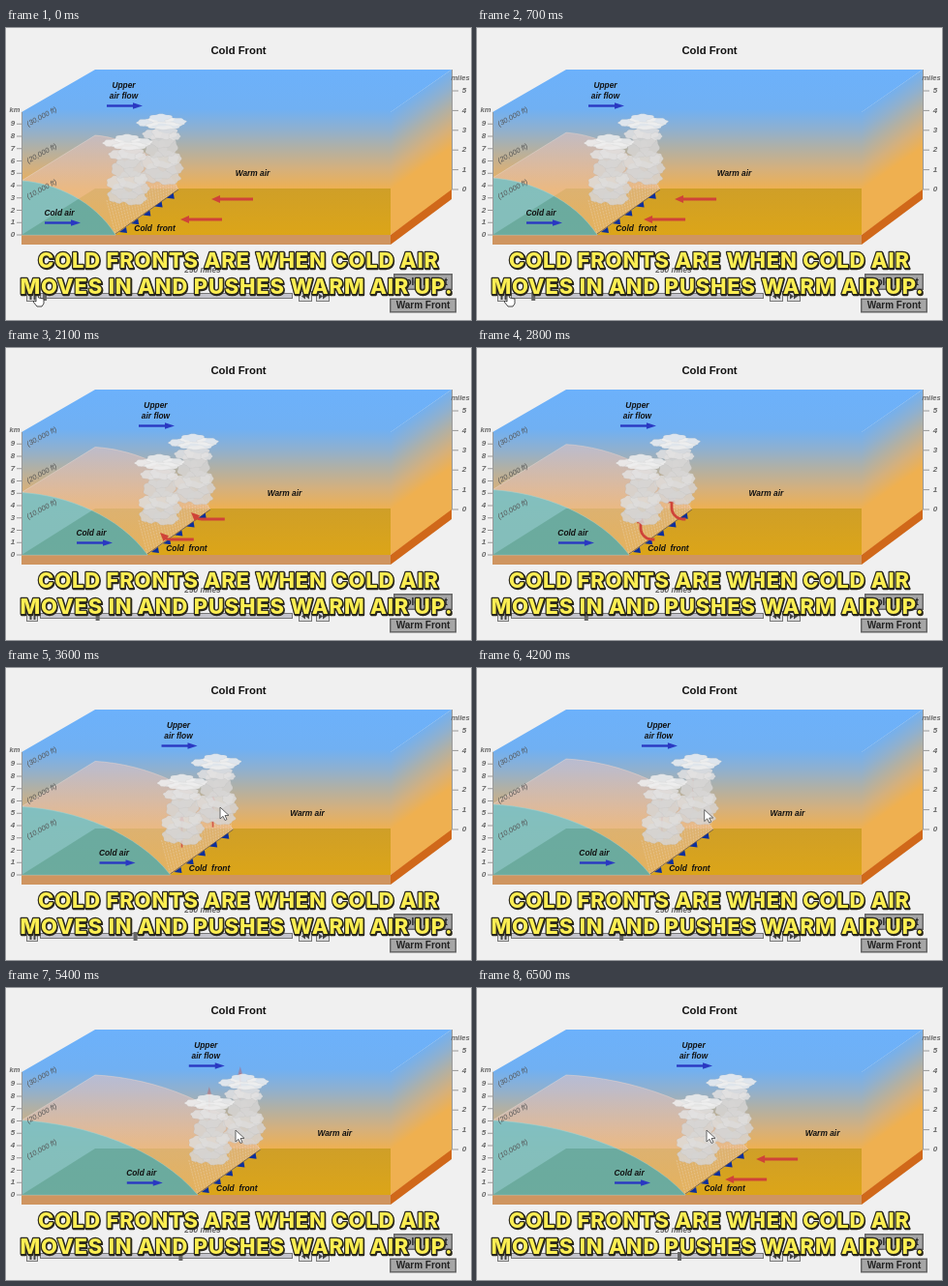
Recreate the animation shown at these times as an HTML page with a canvas. Size 480 px wide and 302 px high, loop 6.6 s.

```html
<!DOCTYPE html>
<html>
<head>
<meta charset="utf-8">
<title>Cold Front</title>
<style>
html, body { margin: 0; width: 100%; height: 100%; overflow: hidden; background: #f0f0f0; }
canvas { display: block; width: 480px; height: 302px; }
</style>
</head>
<body>
<canvas id="stage"></canvas>
<script>
const W = 480, H = 302, LOOP = 6600;
const canvas = document.getElementById('stage');
const c = canvas.getContext('2d');
const dpr = window.devicePixelRatio || 1;
canvas.width = W * dpr;
canvas.height = H * dpr;

const SANS = '"Liberation Sans", Arial, sans-serif';
const clamp = (v) => Math.max(0, Math.min(1, v));

function poly(pts, fill, stroke, width = 1) {
  c.beginPath();
  pts.forEach(([x, y], i) => i ? c.lineTo(x, y) : c.moveTo(x, y));
  if (fill) { c.closePath(); c.fillStyle = fill; c.fill(); }
  if (stroke) { c.strokeStyle = stroke; c.lineWidth = width; c.stroke(); }
}

function label(str, x, y, size, color = '#111', style = 'italic bold') {
  c.font = `${style} ${size}px ${SANS}`;
  c.textAlign = 'center';
  c.textBaseline = 'middle';
  c.fillStyle = color;
  c.fillText(str, x, y);
}

function skyFill(y0, y1) {
  const g = c.createLinearGradient(0, y0, 0, y1);
  [[0, '#6cb1fb'], [.33, '#70b0f3'], [.5, '#8fb0cf'], [.65, '#b0b0a6'], [.83, '#d5b07c'], [1, '#efb050']]
    .forEach(([p, col]) => g.addColorStop(p, col));
  return g;
}

function box() {
  poly([[16, 87], [92, 43], [460, 43], [397, 87], [397, 214], [16, 214]], skyFill(43, 167));
  // right face: the same gradient, sheared, continuing from the back wall
  c.save();
  c.transform(1, -44 / 63, 0, 1, 397, 87);
  c.fillStyle = skyFill(-44, 80);
  c.fillRect(-.5, 0, 63.5, 127);
  c.restore();
  const g = c.createLinearGradient(0, 166, 0, 214);
  g.addColorStop(0, '#cf9f28');
  g.addColorStop(1, '#dca518');
  poly([[92, 166], [397, 166], [397, 214], [16, 214]], g);
  poly([[16, 214], [397, 214], [397, 224], [16, 224]], '#cf9560');
  poly([[397, 214], [460, 167], [460, 177], [397, 224]], '#d0681a');
}

function scales() {
  const grey = '#666';
  poly([[16.5, 87], [16.5, 214]], null, '#999');
  poly([[460.5, 43], [460.5, 167]], null, '#999');
  label('km', 9, 85, 7.5, grey);
  for (let i = 0; i < 10; i++) {
    const y = 214 - i * 12.75;
    label(i, 7, y, 8, grey);
    poly([[11, y], [16, y]], null, '#999');
  }
  label('miles', 469, 52, 7.5, grey);
  for (let i = 0; i < 6; i++) {
    const y = 167 - i * 20.4;
    label(i, 473, y, 8, grey);
    poly([[460, y], [467, y]], null, '#999');
  }
  [92, 130, 167].forEach((y, i) => {
    c.save();
    c.translate(37, y);
    c.rotate(-.5);
    label(`(${3 - i}0,000 ft)`, 0, 0, 7.5, '#555', 'italic');
    c.restore();
  });
}

function dome(x, y, w, h) {
  c.moveTo(x, y - h);
  c.bezierCurveTo(x + w * .36, y - h * .96, x + w * .78, y - h * .62, x + w, y);
}

function coldAir(base, top) {
  const h = 214 - top;
  const g = c.createLinearGradient(0, 90, 0, 200);
  g.addColorStop(0, 'rgba(222,196,200,.6)');
  g.addColorStop(1, 'rgba(235,190,155,.55)');
  c.beginPath();
  dome(92, 167, base - 27, h);
  c.lineTo(base, 214);
  c.lineTo(16, 214);
  c.lineTo(16, top);
  c.fillStyle = g;
  c.fill();
  c.beginPath();
  dome(92, 167, base - 27, h);
  c.strokeStyle = 'rgba(240,215,205,.45)';
  c.lineWidth = 1;
  c.stroke();
  poly([[16, top], [92, top - 47]], null, 'rgba(235,225,220,.4)');

  c.save();
  c.beginPath();
  dome(16, 214, base - 16, h);
  c.lineTo(16, 214);
  c.fillStyle = 'rgba(112,192,200,.84)';
  c.fill();
  c.strokeStyle = 'rgba(160,210,210,.6)';
  c.stroke();
  c.clip();
  poly([[92, 166], [300, 166], [300, 214], [16, 214]], 'rgba(45,115,85,.26)');
  c.restore();
}

function rain(base) {
  c.save();
  c.setLineDash([2, 1]);
  for (let i = 0; i < 26; i++) {
    const x = base - 9 + i * 2.9, y = 178 - i * .9;
    poly([[x, y], [base + i * 2.5, 213 - i * 1.8]], null, 'rgba(240,232,222,.42)', .7);
  }
  c.restore();
}

function frontLine(base) {
  poly([[base, 213], [base + 65, 167]], null, 'rgba(60,55,60,.6)');
  for (let i = 0; i < 5; i++) {
    const x = base + 4 + i * 12.2, y = 211 - i * 8.8;
    poly([[x, y], [x + 7, y - 5], [x + 8, y + 1]], '#0d2f9c');
  }
}

// rows from the base up: colour, then puffs as dx, dy, rx, ry
const PUFFS = [
  ['#d6d4d3', [[-9, 63, 11, 8], [7, 66, 13, 7], [0, 58, 16, 9], [14, 56, 9, 6]]],
  ['#dedcdb', [[-11, 50, 10, 7], [4, 47, 14, 9], [14, 46, 7, 6]]],
  ['#d6d5d4', [[-5, 36, 11, 9], [7, 34, 10, 10], [1, 27, 12, 8]]],
  ['#e2e1e1', [[-9, 21, 10, 5], [4, 19, 13, 7], [14, 23, 6, 4]]],
  ['#f0f0f0', [[-14, 9, 11, 4], [0, 5, 13, 5], [15, 8, 11, 4], [3, 12, 18, 4]]]
];

function cloud(x, y) {
  c.save();
  c.globalAlpha = .84;
  for (const [color, row] of PUFFS) {
    for (const [dx, dy, rx, ry] of row) {
      c.beginPath();
      const n = 48;
      for (let i = 0; i <= n; i++) {
        const a = i / n * Math.PI * 2, r = 1 + .07 * Math.sin(a * 7 + dx);
        c.lineTo(x + dx + Math.cos(a) * rx * r, y + dy + Math.sin(a) * ry * r);
      }
      c.fillStyle = color;
      c.fill();
      c.strokeStyle = 'rgba(165,165,170,.3)';
      c.lineWidth = .5;
      c.stroke();
    }
  }
  c.restore();
}

function blueArrow(x, y) {
  poly([[x, y], [x + 29, y]], null, '#2a38c2', 2.4);
  poly([[x + 27, y - 3.2], [x + 37, y], [x + 27, y + 3.2]], '#2a38c2');
}

// inflow path: level, a quarter turn, then straight up
function flow(s) {
  const R = 12, arc = R * Math.PI / 2;
  if (s < 43) return [67 - s, 198];
  if (s < 43 + arc) {
    const a = (s - 43) / R;
    return [24 - R * Math.sin(a), 186 + R * Math.cos(a)];
  }
  return [12, 186 - (s - 43 - arc)];
}

function redArrow(base, s, dx, dy, alpha) {
  const at = (d) => {
    const [x, y] = flow(d);
    return [base + x + dx, y + dy];
  };
  const pts = [];
  const len = s > 43 ? 43 - Math.min(8, (s - 43) * .4) : 43;
  for (let d = s - len; d <= s - 7; d++) pts.push(at(d));
  c.save();
  c.globalAlpha = alpha;
  const rising = clamp((s - 85) / 15);
  poly(pts, null, '#cf4338', 2.8 - rising * 1.3);
  const [x0, y0] = at(s - 9), [x1, y1] = at(s);
  const k = (4 - rising * 1.5) / Math.hypot(x1 - x0, y1 - y0);
  const nx = -(y1 - y0) * k, ny = (x1 - x0) * k;
  poly([[x0 + nx, y0 + ny], [x1, y1], [x0 - nx, y0 - ny]], '#cf4338');
  c.restore();
}

function redArrows(base, t) {
  const again = t >= 5500;
  const s = .027 * (again ? t - 5540 : t);
  const alpha = again ? clamp((t - 5400) / 500)
    : t < 2800 ? 1 : .35 + .65 * clamp((5400 - t) / 2600);
  redArrow(base, s, 0, 0, alpha);
  redArrow(base, s, 32, -21, alpha);
}

function button(x, y, w, h, text) {
  c.fillStyle = '#666';
  c.fillRect(x, y, w, h);
  c.fillStyle = '#a6a6a6';
  c.fillRect(x + 1.5, y + 1.5, w - 3, h - 3);
  label(text, x + w / 2, y + h / 2 + .5, 10, '#222', 'bold');
}

function frame(x, y, w, h, fill) {
  c.fillStyle = fill;
  c.fillRect(x, y, w, h);
  c.strokeStyle = '#777';
  c.lineWidth = 1;
  c.strokeRect(x, y, w, h);
}

function controls(t) {
  label('250 miles', 203, 251, 8.3, '#666');
  button(400, 254, 61, 17, 'Cold Front');
  button(396, 279.5, 69, 15, 'Warm Front');
  frame(21.5, 272.5, 11, 10, '#ddd');
  frame(35.5, 274.5, 260, 5, '#c4c4cc');
  c.fillStyle = '#444';
  c.fillRect(24.5, 275, 2, 6);
  c.fillRect(28.5, 275, 2, 6);
  c.fillStyle = '#666';
  c.fillRect(38 + t * .026, 273, 4, 9);
  for (const [x, d] of [[309, -1], [327, 1]]) {
    frame(x - 6.5, 272.5, 13, 10, '#ddd');
    for (const o of [-2, 2]) poly([[x + o - 2 * d, 274.5], [x + o + 2 * d, 277.5], [x + o - 2 * d, 280.5]], '#444');
  }
}

function hand(x, y) {
  poly([[x, y], [x + 2, y], [x + 2.5, y + 4], [x + 8, y + 5], [x + 8, y + 10], [x + 6, y + 13],
    [x + 1, y + 13], [x - 3, y + 8], [x - 2, y + 7], [x, y + 8], [x, y]], '#fff', '#333', .9);
}

function pointer(x, y) {
  poly([[x, y], [x, y + 12], [x + 3, y + 9.3], [x + 5, y + 13.5], [x + 7, y + 12.6], [x + 5, y + 8.6],
    [x + 9, y + 8.4], [x, y]], '#fff', '#555', .9);
}

const TRAIL = [[3000, 200, 240], [3300, 240, 24], [3600, 221, 144], [4300, 237, 147], [6600, 237, 147]];

function cursor(t) {
  if (t < 1700) return hand(31, 275);
  const i = TRAIL.findIndex((p) => p[0] > t);
  if (i < 1) return;
  const [t0, x0, y0] = TRAIL[i - 1], [t1, x1, y1] = TRAIL[i];
  const k = (t - t0) / (t1 - t0);
  pointer(x0 + (x1 - x0) * k, y0 + (y1 - y0) * k);
}

function caption() {
  c.font = '800 22px Inter, sans-serif';
  c.letterSpacing = '0.8px';
  c.textAlign = 'center';
  c.textBaseline = 'alphabetic';
  c.lineJoin = 'round';
  [['COLD FRONTS ARE WHEN COLD AIR', 240, 247.5], ['MOVES IN AND PUSHES WARM AIR UP.', 238, 274.5]].forEach(([s, x, y]) => {
    c.strokeStyle = '#2a281c';
    c.lineWidth = 2.4;
    c.strokeText(s, x, y);
    c.strokeText(s, x + .6, y + 1);
    c.fillStyle = '#fcee52';
    c.fillText(s, x, y);
  });
  c.letterSpacing = '0px';
  c.lineJoin = 'miter';
}

function draw(t) {
  const base = 113 + t * .0157;
  const top = 158 - 21 * clamp(t / 5200);
  c.setTransform(dpr, 0, 0, dpr, 0, 0);
  c.fillStyle = '#f0f0f0';
  c.fillRect(0, 0, W, H);
  label('Cold Front', 240, 24, 11.3, '#111', 'bold');
  box();
  coldAir(base, top);
  scales();
  rain(base);
  frontLine(base);
  redArrows(base, t);
  cloud(base + 47, 89);
  cloud(base + 12, 110);
  label('Upper', base + 8.5, 60, 8.4);
  label('air flow', base + 8.5, 70.5, 8.4);
  blueArrow(base - 9, 80.5);
  label('Cold air', base - 58, 192, 8.4);
  blueArrow(base - 73, 201.5);
  label('Warm air', base + 141.5, 150.5, 8.4);
  label('Cold  front', base + 40.5, 208, 8.4);
  controls(t);
  cursor(t);
  caption();
}

function tick(now) {
  draw(Math.floor(now % LOOP / 100) * 100);
  requestAnimationFrame(tick);
}
requestAnimationFrame(tick);
</script>
</body>
</html>
```
